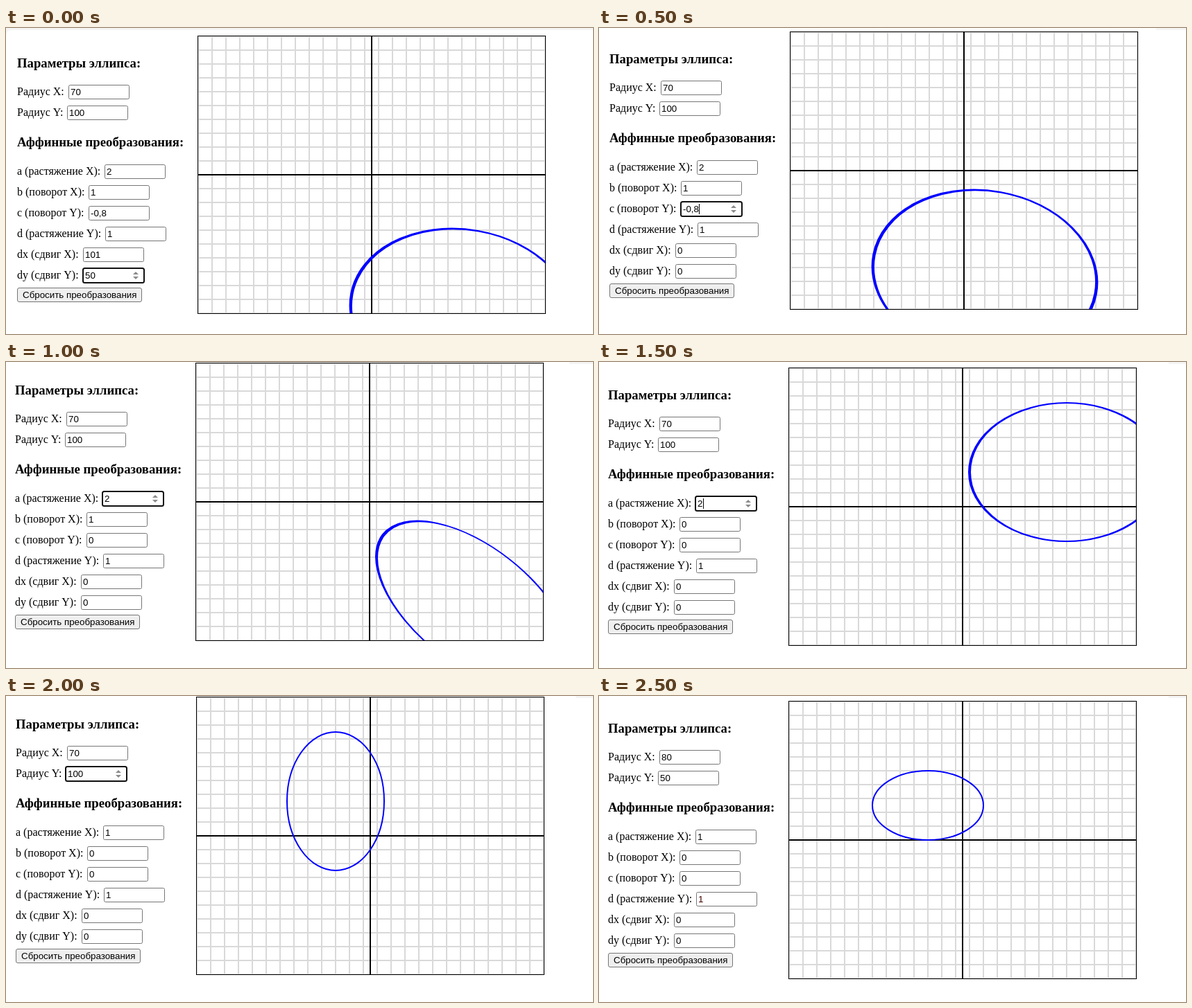
Animation, 846 px wide and 442 px high, one loop 3 s. Source, as an HTML page:

```html
<!DOCTYPE html>
<html lang="ru">
<head>
<meta charset="utf-8">
<style>
  html, body { margin: 0; width: 100%; height: 100%; overflow: hidden; background: #fff; }
  svg { display: block; }
  text { font: 16px "Liberation Serif", "Times New Roman", serif; white-space: pre; }
  .title { font-size: 18.72px; font-weight: bold; }
  .ui { font: 13.333px "Liberation Sans", Arial, sans-serif; }
</style>
</head>
<body>
<svg id="stage" width="846" height="442" viewBox="0 0 846 442"></svg>
<script>
const STEP = 500;

// Label, left edge and top edge of each number field, relative to the panel.
const FIELDS = [
  ['Радиус X:', 74, 71],
  ['Радиус Y:', 72, 101],
  ['a (растяжение X):', 126, 186],
  ['b (поворот X):', 103, 216],
  ['c (поворот Y):', 103, 246],
  ['d (растяжение Y):', 127, 276],
  ['dx (сдвиг X):', 95, 306],
  ['dy (сдвиг Y):', 95, 336]
];

// values: rx, ry, a, b, c, d, dx, dy; bar: left end of the strip at the top
const STATES = [
  { x: 16, y: 11, bar: 0, values: [70, 100, 2, 1, -0.8, 1, 101, 50], focus: 7 },
  { x: 15, y: 5, bar: 803, values: [70, 100, 2, 1, -0.8, 1, 0, 0], focus: 4, caret: 26 },
  { x: 13, y: 1, bar: 812, values: [70, 100, 2, 1, 0, 1, 0, 0], focus: 2 },
  { x: 13, y: 8, bar: 821, values: [70, 100, 2, 0, 0, 1, 0, 0], focus: 2, caret: 11 },
  { x: 14, y: 1, bar: 821, values: [70, 100, 1, 0, 0, 1, 0, 0], focus: 1 },
  { x: 13, y: 7, bar: 821, values: [80, 50, 1, 0, 0, 1, 0, 0], tinted: 5 }
];

const text = (x, y, content, cls = '', fill = '#000') =>
  `<text x="${x}" y="${y}" class="${cls}" fill="${fill}">${content}</text>`;

const box = (x, y, w, h, fill, stroke, width = 1, r = 2) =>
  `<rect x="${x}" y="${y}" width="${w}" height="${h}" rx="${r}" fill="${fill}" stroke="${stroke}" stroke-width="${width}"/>`;

function field([label, x, top], i, state) {
  const focused = state.focus === i;
  const value = String(state.values[i]).replace('.', ',');
  let out = text(0, top + 15, label);
  out += focused
    ? box(x, top, 88, 21, '#fff', '#101010', 2, 2.5)
    : box(x + .5, top + .5, 87, 20, '#fff', '#767676');
  out += text(x + 3, top + 15, value, 'ui', state.tinted === i ? '#400000' : '#000');
  if (focused) {
    out += `<path d="M${x + 72} ${top + 9}l4 -4 4 4zM${x + 72} ${top + 12}l4 4 4 -4z" fill="#8a8a8a"/>`;
    if (state.caret) out += `<path d="M${x + state.caret + .5} ${top + 3}v15" stroke="#000"/>`;
  }
  return out;
}

function plot([rx, ry, ...matrix]) {
  let grid = '';
  for (let p = 0; p <= 500; p += 20) {
    grid += `M${p} 0V400`;
    if (p <= 400) grid += `M0 ${p}H500`;
  }
  return box(260.5, .5, 501, 401, '#fff', '#000', 1, 0) +
    `<svg x="261" y="1" width="500" height="400" fill="none" stroke-width="2">
      <path d="${grid}" stroke="#d9d9d9"/>
      <path d="M250 0V400M0 200H500" stroke="#000"/>
      <ellipse cx="200" cy="150" rx="${rx}" ry="${ry}" stroke="#00f" transform="matrix(${matrix})"/>
    </svg>`;
}

function render(state) {
  const strip = `<rect x="${state.bar}" width="846" height="${state.bar ? 3 : 12}" fill="#f5f5f5"/>` +
    (state.bar ? '' : '<rect y="3" width="860" height="450" rx="8" fill="#fff"/>');
  return strip + `<g transform="translate(${state.x} ${state.y})">` +
    text(0, 46, 'Параметры эллипса:', 'title') +
    text(0, 160, 'Аффинные преобразования:', 'title') +
    FIELDS.map((f, i) => field(f, i, state)).join('') +
    box(.5, 364.5, 179, 20, '#efefef', '#767676', 1, 2.5) +
    text(8, 379, 'Сбросить преобразования', 'ui') +
    plot(state.values) + '</g>';
}

const stage = document.getElementById('stage');
let shown = -1;

function tick() {
  const index = Math.floor(performance.now() / STEP) % STATES.length;
  if (index !== shown) stage.innerHTML = render(STATES[shown = index]);
  requestAnimationFrame(tick);
}
tick();
</script>
</body>
</html>
```
